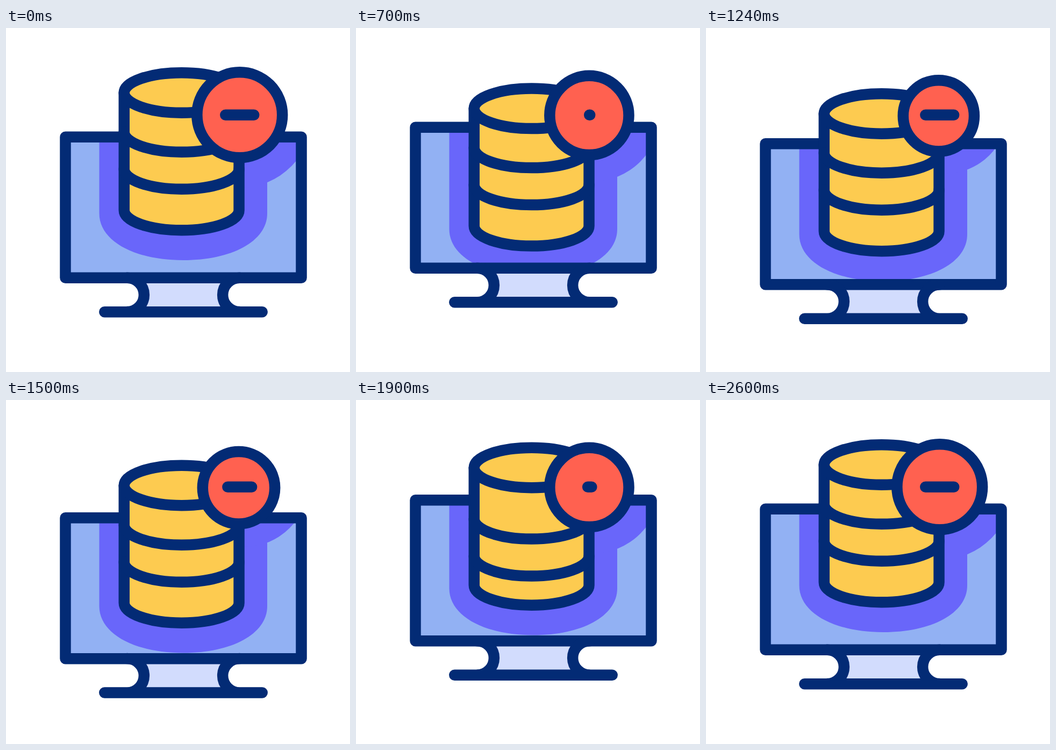
An HTML page for the animation above (2820 ms loop, 640 by 640 pixels).

```html
<!DOCTYPE html>
<html lang="en">
<head>
<meta charset="utf-8">
<title>Remove database</title>
<style>
  html, body { margin: 0; width: 100%; height: 100%; overflow: hidden; background: #fff; }
  svg { display: block; width: 100vw; height: 100vh; }
  .line { fill: none; stroke: #032b75; stroke-width: 20.5; stroke-linecap: round; stroke-linejoin: round; }
</style>
</head>
<body>
<svg viewBox="0 0 640 640">
  <defs>
    <clipPath id="screen"><rect id="window" x="110.5" y="202.75" width="439" height="262"/></clipPath>
  </defs>
  <g id="monitorFill">
    <path fill="#d2dcfd" d="M225.2 464.7a31.7 31.7 0 0 1 0 63.4H434.8a31.7 31.7 0 0 1 0-63.4z"/>
    <rect x="110.5" y="202.75" width="439" height="262" fill="#92b1f3"/>
  </g>
  <g clip-path="url(#screen)" fill="#6966fa">
    <path id="shadow" d="M173.5 60V345C173.5 397 240 432 329.75 432S486 397 486 345V60z"/>
    <circle id="halo"/>
  </g>
  <g id="monitorLine" class="line">
    <rect x="110.5" y="202.75" width="439" height="262"/>
    <path d="M225.2 464.7a31.7 31.7 0 0 1 0 63.4M434.8 464.7a31.7 31.7 0 0 0 0 63.4M183.3 528.2H476.7"/>
  </g>
  <g id="drum">
    <path class="line" style="fill:#fdcb50" d="M219.75 120.5a106.9 37.25 0 0 1 213.8 0V339a106.9 37.25 0 0 1-213.8 0z"/>
    <path class="line" d="M219.75 120.5a106.9 37.25 0 0 0 213.8 0"/>
  </g>
  <path id="bands" class="line" d="M219.75 193.5a106.9 37.25 0 0 0 213.8 0M219.75 262.5a106.9 37.25 0 0 0 213.8 0"/>
  <circle id="badge" class="line" style="fill:#ff6150"/>
  <path id="minus" class="line"/>
</svg>
<script>
const LOOP = 2820;
const el = id => document.getElementById(id);
const part = {};
for (const id of ['window', 'monitorFill', 'monitorLine', 'shadow', 'halo', 'drum', 'bands', 'badge', 'minus']) part[id] = el(id);

const progress = (t, a, b) => Math.min(1, Math.max(0, (t - a) / (b - a)));
const smooth = (t, a, b) => { const p = progress(t, a, b); return p * p * (3 - 2 * p); };
const shift = (node, y) => node.setAttribute('transform', `translate(0 ${y.toFixed(3)})`);

function circle(node, x, y, r) {
  node.setAttribute('cx', x);
  node.setAttribute('cy', y);
  node.setAttribute('r', r);
}

function draw(t) {
  // the monitor bobs up, down, up and home
  const bob = 19.3 * (-smooth(t, 200, 800) + 2 * smooth(t, 800, 1400)
    - 2 * smooth(t, 1400, 2000) + smooth(t, 2000, 2600));
  shift(part.monitorFill, bob);
  shift(part.monitorLine, bob);
  shift(part.window, bob);

  // the drum sinks, then its rings follow it back late
  const sink = 39 * (1 - Math.pow(1 - progress(t, 200, 1300), 2.3));
  const drumY = sink * (1 - smooth(t, 1460, 2036));
  shift(part.drum, drumY);
  shift(part.shadow, drumY);
  shift(part.bands, sink * (1 - smooth(t, 1710, 2250)));

  const k = smooth(t, 200, 1300) - smooth(t, 1300, 2400);
  circle(part.badge, 434.75 - 1.9 * k, 161.75 + 1.65 * k, 79.4 - 13.4 * k);
  circle(part.halo, 434.75 + 11 * k, 161.75 - 6.3 * k, 135.5 - 20.5 * k);

  // two squeezes of the minus sign
  const squeeze = s => smooth(t, s, s + 345) - smooth(t, s + 345, s + 955);
  const half = Math.max(0.01, 26.5 * (1 - squeeze(305) - squeeze(1415)));
  part.minus.setAttribute('d', `M${434.75 - half} 161.75H${434.75 + half}`);
}

const start = performance.now();
function tick() {
  draw((performance.now() - start) % LOOP);
  requestAnimationFrame(tick);
}
draw(0);
requestAnimationFrame(tick);
</script>
</body>
</html>
```
